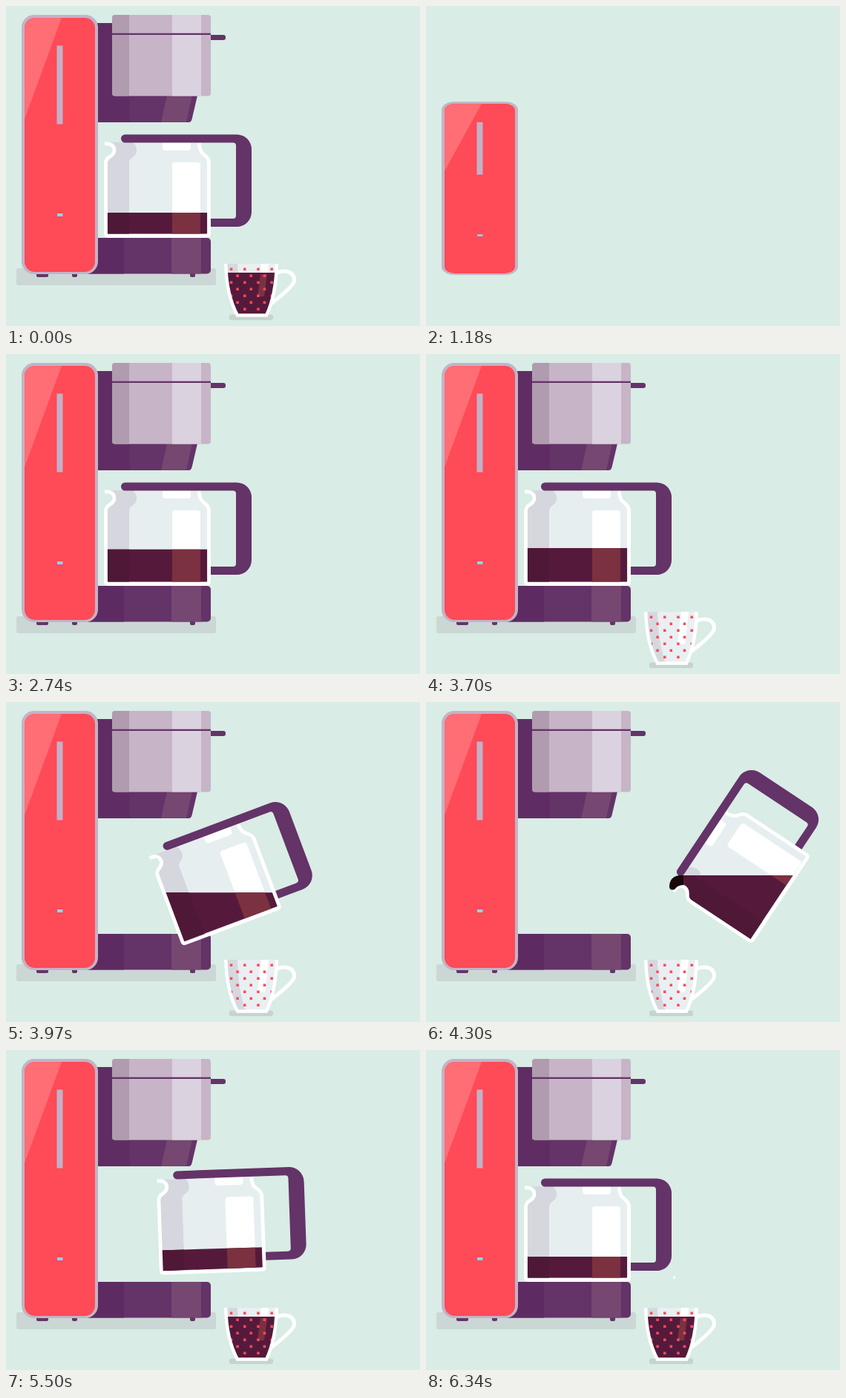
Write an HTML page that moves like this. It is 558 px wide and 432 px high and loops after 6400 ms.

```html
<!DOCTYPE html>
<html lang="en">
<head>
<meta charset="utf-8">
<title>Coffee time</title>
<style>
html, body { margin: 0; width: 100%; height: 100%; overflow: hidden; background: #d9ece5; }
svg { display: block; width: 100vw; height: 100vh; }
</style>
</head>
<body>
<svg viewBox="0 0 558 432">
  <defs>
    <clipPath id="panel"><rect x="25" y="16" width="95" height="343" rx="14"/></clipPath>
    <clipPath id="lidBox"><rect x="143" y="12" width="133" height="109.5" rx="4"/></clipPath>
    <clipPath id="baseBox"><rect x="106" y="313" width="170" height="48.500" rx="5"/></clipPath>
    <clipPath id="glass"><path d="M133 184Q146 185 146 195Q146 200 139 204Q134.500 207 134.500 212V307.500H273.500V210Q273 205 266 200Q261 196 261 184Z"/></clipPath>
    <clipPath id="wet"><rect id="level" x="-400" width="1400" height="900"/></clipPath>
    <clipPath id="cupBox"><path d="M296 348Q297 390 312 416H351Q364 390 365 348Z"/></clipPath>
  </defs>
  <rect id="floor" x="14" y="354" width="269" height="23" rx="3" fill="#cbd7d5"/>
  <g id="machine">
    <g id="feet" fill="#643468">
      <rect x="41" y="358" width="16" height="8" rx="2"/>
      <rect x="89" y="358" width="7" height="8" rx="2"/>
      <rect x="248" y="358" width="7" height="8" rx="2"/>
    </g>
    <g id="base"><g clip-path="url(#baseBox)">
      <rect x="106" y="313" width="170" height="49" fill="#643368"/>
      <rect x="106" y="313" width="53" height="49" fill="#5d2b61"/>
      <rect x="223" y="313" width="40" height="49" fill="#754771"/>
    </g></g>
    <g id="head">
      <path d="M110 23H258V121L250.500 153Q249.500 157 246 157H110Z" fill="#643368"/>
      <path d="M110 23H167V157H110Z" fill="#5f2d63"/>
      <path d="M217 121H251L243 157H209Z" fill="#754771"/>
      <rect id="knob" x="270" y="39" width="26" height="7" rx="3" fill="#643368"/>
      <g clip-path="url(#lidBox)">
        <rect x="143" y="12" width="133" height="110" fill="#c7b5c7"/>
        <rect x="143" y="12" width="23" height="110" fill="#b09cae"/>
        <rect x="224" y="12" width="39" height="110" fill="#dbd2df"/>
      </g>
      <rect x="143" y="36.700" width="133" height="2.300" fill="#643368"/>
    </g>
    <g id="tower">
      <rect x="21" y="12" width="103" height="350" rx="17" fill="#c3b3c6"/>
      <g clip-path="url(#panel)">
        <rect x="25" y="16" width="95" height="343" fill="#ff4a57"/>
        <path d="M25 16H75L25 153Z" fill="#ff6d75"/>
      </g>
      <rect x="68.500" y="53.500" width="8" height="106" fill="#c4b0c6"/>
      <rect x="69" y="280" width="7.500" height="4" fill="#82daf2"/>
    </g>
  </g>
  <g id="pot">
    <g clip-path="url(#glass)">
      <rect x="130" y="184" width="146" height="126" fill="#e6eef0"/>
      <path d="M130 184H171Q176 188 176 195Q176 201 171 204Q166 207 166 212V310H130Z" fill="#d6d7de"/>
      <path d="M211 180H249V191Q249 195 245 195H215Q211 195 211 191Z" fill="#fff"/>
      <rect x="224" y="211" width="38" height="102" rx="4" fill="#fff"/>
      <g clip-path="url(#wet)">
        <rect x="130" y="184" width="146" height="126" fill="#551a3b"/>
        <rect x="130" y="184" width="36" height="126" fill="#4f1837"/>
        <rect x="224" y="211" width="38" height="100" fill="#7b3140"/>
      </g>
    </g>
    <path d="M133 186Q146 185 146 195Q146 200 139 204Q134.500 207 134.500 212V307Q134.500 310.500 138 310.500H270Q273.500 310.500 273.500 307V210Q273 205 266 200Q260.500 196 260.500 185" fill="none" stroke="#fff" stroke-width="4.800"/>
    <path d="M160.500 173.500H311A20 20 0 0 1 331 193.500V278A20 20 0 0 1 311 298H276V287H306A4 4 0 0 0 310 283V188.500A4 4 0 0 0 306 184.500H160.500A5.500 5.500 0 0 1 160.500 173.500Z" fill="#643368"/>
  </g>
  <path id="lip" d="M347 234H341Q328 236 328 250Q329 255 335 253Q339 247 347 247Z" fill="#170a08"/>
  <g id="cup">
    <rect x="301" y="416.500" width="59" height="7.500" rx="3" fill="#c6d3cf"/>
    <path d="M363 361Q370 357.500 377 358Q389 360 388.500 371Q387 379 357 402" fill="none" stroke="#fff" stroke-width="5"/>
    <g clip-path="url(#cupBox)">
      <rect x="294" y="348" width="73" height="70" fill="#e9eff2"/>
      <path d="M294 348H312Q313 390 323 418H294Z" fill="#d5d9df"/>
      <path d="M344 348H354L349 392H339Z" fill="#fff"/>
    </g>
    <line id="stream" x1="330" x2="330" stroke="#170a08" stroke-width="6" stroke-linecap="round"/>
    <g clip-path="url(#cupBox)">
      <rect id="brew" x="294" width="73" height="80" fill="#551a3b"/>
      <path id="shine" d="M343 362H352L348 392H339Z" fill="#7b3140"/>
      <g id="dots" fill="#ff4a57"></g>
    </g>
    <path d="M296.200 348Q297 390 312 417.500H351Q364 390 364.800 348" fill="none" stroke="#fff" stroke-width="4.400"/>
  </g>
  <path id="steam" d="M331 346Q327 336 332 326Q336.500 316 334.500 306.500" pathLength="100" fill="none" stroke="#fff" stroke-linecap="round"/>
</svg>
<script>
const LOOP = 6400, HOLD = 1000, STEP = 30;
const $ = id => document.getElementById(id);
const put = (id, attrs) => { for (const k in attrs) $(id).setAttribute(k, attrs[k]); };
const show = (id, on) => put(id, { visibility: on ? 'visible' : 'hidden' });

const linear = p => p;
const inQuad = p => p * p;
const outQuad = p => 1 - (1 - p) ** 2;
const outCubic = p => 1 - (1 - p) ** 3;
const inOut = p => p < .5 ? 4 * p ** 3 : 1 - 4 * (1 - p) ** 3;
const part = (t, a, b, ease = linear) => ease(Math.min(1, Math.max(0, (t - a) / (b - a))));
const mix = (a, b, p) => a + (b - a) * p;
const scaleAt = (x, y, sx, sy) => `translate(${x} ${y}) scale(${sx} ${sy}) translate(${-x} ${-y})`;

const REST = { x: 231, y: 243 };
const REACH = { x: 97, y: 58 };   // from the spout to the pot's centre

for (let row = 0; row < 7; row++)
  for (let x = row % 2 ? 312 : 303.500; x < 366; x += 18.200) {
    const dot = document.createElementNS('http://www.w3.org/2000/svg', 'rect');
    for (const [k, v] of Object.entries({ x: x - 1.700, y: 353.500 + row * 9, width: 3.500, height: 3.500 })) dot.setAttribute(k, v);
    $('dots').append(dot);
  }

function drawMachine(t) {
  const grow = part(t, 1060, 1450, outCubic);
  const floor = part(t, 1480, 1900, outCubic);
  put('floor', { transform: scaleAt(148.500, 365.500, floor, floor) });
  put('machine', { transform: `translate(0 ${1 - part(t, 1840, 1930)})` });
  put('tower', { transform: scaleAt(72, 362, 1, grow) });
  put('base', { transform: scaleAt(112, 337, part(t, 1300, 1660, outCubic), 1) });
  put('head', { transform: scaleAt(112, 90, part(t, 1340, 1720, outCubic), 1) });
  put('knob', { width: mix(4, 26, part(t, 1640, 1900, outQuad)) });
  show('feet', t > 1330);
}

function tiltAt(t) {
  if (t < 4300) return 56.400 * part(t, 3700, 4300, inOut);
  if (t < 4600) return mix(56.400, 64, part(t, 4300, 4600, inOut));
  if (t < 5170) return mix(64, 44.400, part(t, 4600, 5170, inQuad));
  return mix(44.400, 0, part(t, 5170, 5590, outQuad));
}

function centreAt(t, tilt) {
  const hang = a => 333.700 + REACH.x * Math.cos(a * Math.PI / 180) + REACH.y * Math.sin(a * Math.PI / 180);
  if (t < 3700) return { x: REST.x + 430 * (1 - part(t, 1660, 2260, outCubic)), y: REST.y };
  const away = t < 4300 ? part(t, 3700, 4300, inOut) : 1 - part(t, 5220, 5720, inOut);
  const pourX = hang(t < 4300 ? 56.400 : Math.max(tilt, 44.400));
  return { x: mix(REST.x, pourX, away), y: mix(REST.y, 206, away) };
}

// Coffee surface, measured from the pot's centre
function depthAt(t) {
  if (t < 3700) return mix(67, 19, part(t, 2290, 2960, outCubic));
  if (t < 4300) {
    const p = part(t, 3700, 4300, inOut);
    return mix(19, 28, p) + 6 * Math.sin(Math.PI * p);
  }
  if (t < 5170) return mix(28, 43, part(t, 4300, 5170));
  return mix(43, 36, part(t, 5170, 5720, inOut));
}

function sloshAt(t) {
  if (t < 5170) return 3.300 * part(t, 4900, 5170, inOut);
  return 3.300 * Math.cos((t - 5170) / 95) * (1 - part(t, 5170, 5900));
}

function drawPot(t) {
  const tilt = tiltAt(t), c = centreAt(t, tilt);
  const dx = c.x - REST.x, dy = c.y - REST.y, y = c.y + depthAt(t);
  put('pot', { transform: `translate(${dx} ${dy}) rotate(${-tilt} ${REST.x} ${REST.y})` });
  put('level', {
    y,
    transform: `rotate(${tilt} ${REST.x} ${REST.y}) translate(${-dx} ${-dy}) rotate(${sloshAt(t)} ${c.x - 22} ${y})`
  });
  show('pot', t >= 1660);

  const a = tilt * Math.PI / 180;
  return c.y + REACH.x * Math.sin(a) - REACH.y * Math.cos(a);
}

function drawCup(t, spout) {
  const fall = since => .005 * Math.max(0, t - since) ** 2;
  const surface = mix(417, 360, part(t, 4430, 5240, outQuad));
  const top = t < 5040 ? spout - 4 : 243 + fall(5040);
  const end = Math.min(spout - 5 + fall(4300), surface + 2);
  put('cup', { transform: `translate(${270 * (1 - part(t, 3010, 3590, outCubic))} 0)` });
  show('cup', t >= 3010);
  put('brew', { y: surface });
  show('shine', surface < 363 && t >= 3010);
  put('stream', { y1: top, y2: end });
  show('stream', t > 4300 && t < 5240 && end > top);
  put('lip', { transform: `translate(0 ${spout - 254.700})` });
  show('lip', t >= 4290 && t < 5040);
}

function drawSteam(t) {
  const tip = 100 * part(t, 5720, 6120, outQuad), tail = 100 * part(t, 5900, 6350);
  put('steam', {
    'stroke-dasharray': `${Math.max(.1, tip - tail)} 300`,
    'stroke-dashoffset': -tail,
    'stroke-width': mix(4, 3, part(t, 6150, 6340))
  });
  show('steam', t > 5720 && t < 6400 && tip > tail);
}

function draw(time) {
  let t = time % LOOP;
  t = t < HOLD ? LOOP : Math.min(6340, HOLD + Math.floor((t - HOLD) / STEP) * STEP);
  drawMachine(t);
  drawCup(t, drawPot(t));
  drawSteam(t);
}

const start = performance.now();
function tick() {
  draw(performance.now() - start);
  requestAnimationFrame(tick);
}
tick();
</script>
</body>
</html>
```
